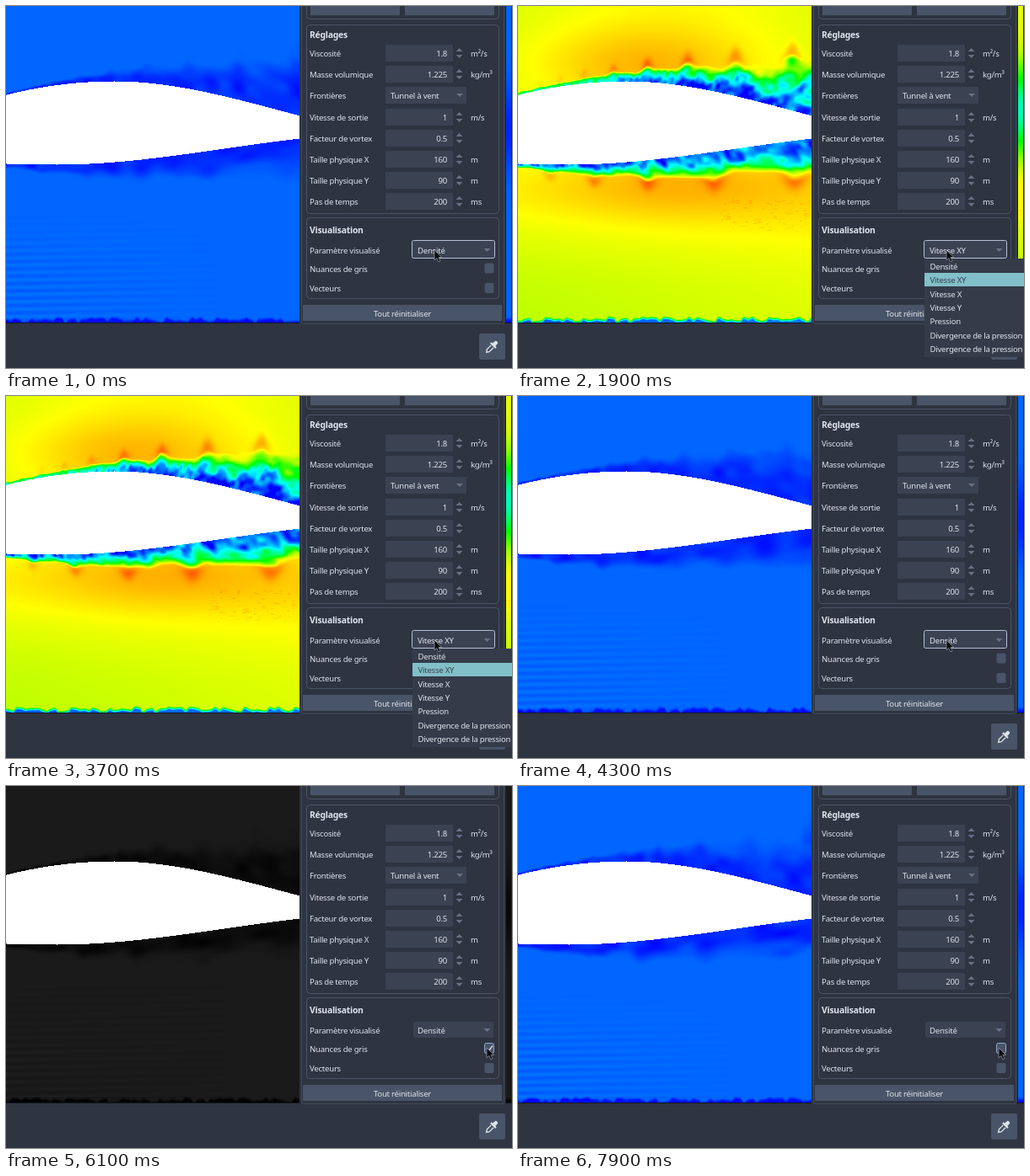
Animation of 600 by 430 pixels, one loop 8 s. Source, as an HTML page with a canvas:

```html
<!DOCTYPE html>
<html lang="fr">
<head>
<meta charset="utf-8">
<style>
html, body { margin: 0; width: 100%; height: 100%; overflow: hidden; background: #2e3440; }
canvas { display: block; }
</style>
</head>
<body>
<canvas id="stage" width="600" height="430"></canvas>
<script>
const ctx = document.getElementById('stage').getContext('2d');
const LOOP = 8000, STEP = 100, SIM_H = 376, WING_W = 349, STRIP_X = 593, STRIP_W = 6;
const DENSITY = 0, SPEED = 1, SPEED_X = 2;
const OPTIONS = ['Densité', 'Vitesse XY', 'Vitesse X', 'Vitesse Y', 'Pression',
  'Divergence de la pression', 'Divergence de la pression'];
const INK = '#dfe4ec', FIELD = '#3b4252', BUTTON = '#4a5468', BASE = '#2e3440', LINE = '#4c5568';

const clamp = (v, a = 0, b = 1) => Math.min(b, Math.max(a, v));
const mix = (a, b, k) => a + (b - a) * k;
const smooth = (v, a, b) => { const k = clamp((v - a) / (b - a)); return k * k * (3 - 2 * k); };
const bell = (v, mid, width) => Math.exp(-(((v - mid) / width) ** 2));

// Smooth value noise
function hash(i, j) {
  const s = Math.sin(i * 127.1 + j * 311.7) * 43758.5453;
  return s - Math.floor(s);
}
function noise(x, y) {
  const i = Math.floor(x), j = Math.floor(y);
  const a = smooth(x - i, 0, 1), b = smooth(y - j, 0, 1);
  return mix(mix(hash(i, j), hash(i + 1, j), a), mix(hash(i, j + 1), hash(i + 1, j + 1), a), b);
}

// Wing outline
function wingTop(x) {
  const d = x - 128;
  return 89 + d * d * (d < 0 ? 0.00098 : 0.001327 - 2.18e-6 * d);
}
function wingBottom(x) {
  const d = x - 60;
  return 188 - d * d * (d < 0 ? 0.00028 : 0.00072 - 1.2e-6 * d);
}

// Undisturbed flow, as a position 0..1 on the rainbow
function freeFlow(mode, x, y, upper) {
  if (mode === DENSITY) {
    const stripes = smooth(y, 235, 330) * clamp(1 - x / 260);
    return 0.1 + 0.012 * stripes * Math.sin(y * 0.72 + x * 0.012);
  }
  const speckle = !upper && x > 240 && x < 345 && y > 228 && y < 268 && noise(x / 5, y / 1.5) > 0.8 ? 0.02 : 0;
  if (mode === SPEED) {
    return speckle + (upper
      ? 0.7 + 0.05 * bell(x, 190, 180) + 0.075 * bell(x, 140, 130) * bell(y, 68, 45)
      : 0.685 + 0.03 * clamp(x / 350) + 0.045 * bell(y, 235, 75)
        + 0.085 * bell(y, 212, 42) * (0.35 + 0.65 * bell(x, 180, 140)));
  }
  return speckle + (upper
    ? 0.8 + 0.035 * clamp(x / 200) - 0.04 * bell(y, 95, 20) * clamp(1 - x / 120)
    : 0.79 + 0.085 * bell(x, 205, 130) * bell(y, 235, 55) - 0.03 * bell(x, 0, 60) * bell(y, 200, 50));
}

function layerFlow(mode, x, d, wave, height, upper, free) {
  if (d > height * 1.3 + 25) return free;
  const crest = Math.exp(2.5 * (Math.cos(2 * Math.PI * wave) - 1));
  const edge = height * (0.88 + 0.22 * crest);
  const u = d / edge + 0.25 * (noise(wave * 3 + 40, d / 12) - 0.5);
  if (mode === DENSITY) {
    const swirl = noise(wave * 4 + 90, d / 14) - 0.5;
    return free - 0.075 * (1 - smooth(u, 0.3, 1.25)) * (0.85 + 0.8 * swirl);
  }
  const fine = noise(wave * 13 + 60 - d / 16, d / 7) - 0.5;
  const swirl = 0.6 * (noise(wave * 5 + 90 - d / 30, d / 16) - 0.5) + 0.4 * fine;
  let core;
  if (mode === SPEED) {
    // Slow at the wall, faster towards the free stream
    const wall = upper ? mix(0.42, 0.1, smooth(x, 30, 180)) : 0.12;
    core = mix(wall, 0.5, smooth(u, 0.1, 0.95)) + swirl * 0.5;
  } else {
    core = (upper ? 0.38 : 0.4) + 0.08 * u + swirl * 0.3 - 0.25 * crest ** 3 * bell(u, 0.5, 0.3);
  }
  const reach = 4 + 6 * clamp(height / 30);
  const lump = (mode === SPEED ? 0.08 : 0.11) * clamp(height / 16) * crest * bell(d, edge + 4, reach);
  return mix(core, free, smooth(u, 0.65, 1.08)) + lump;
}

function stripFlow(mode, y) {
  const free = freeFlow(mode, 340, y, y < 130) - (mode === SPEED && y > 130 ? 0.04 : 0);
  const low = mode === DENSITY ? 0.035 : mode === SPEED ? 0.32 : 0.55;
  return mix(free, low, bell(y, mode === DENSITY ? 145 : 122, 48));
}

function paintValue(data, k, v, gray) {
  v = clamp(v);
  const s = v * 4;
  data[k] = 255 * (gray ? v : clamp(s - 2));
  data[k + 1] = 255 * (gray ? v : Math.min(clamp(s), clamp(4 - s)));
  data[k + 2] = 255 * (gray ? v : clamp(2 - s));
  data[k + 3] = 255;
}

const wind = ctx.createImageData(WING_W, SIM_H);
const strip = ctx.createImageData(STRIP_W, SIM_H);

function drawFlow(sec, mode, gray) {
  const floorCut = mode === DENSITY ? 0.09 : 0.6;
  for (let x = 0; x < WING_W; x++) {
    const top = wingTop(x), bottom = wingBottom(x);
    const upWave = Math.log(1 + 0.00944 * x) / 0.17 - 0.25 - 0.38 * (sec - 1.9);
    const lowWave = 5 * Math.log(1 + x / 200) - 0.85 - 0.48 * (sec - 1.9);
    const floorWave = noise(x / 5 - sec * 5, 3) - 0.5;
    for (let y = 0; y < SIM_H; y++) {
      const k = (y * WING_W + x) * 4;
      if (y >= top && y <= bottom) {
        wind.data.fill(255, k, k + 4);
        continue;
      }
      const upper = y < top;
      let v = freeFlow(mode, x, y, upper);
      v = upper
        ? layerFlow(mode, x, top - y, upWave, 3 + 0.00055 * x * x, true, v)
        : layerFlow(mode, x, y - bottom, lowWave, 5 + 0.11 * x, false, v);
      if (y > 367) v -= floorCut * smooth((y - 370) / 5 + floorWave * 1.2, 0, 1);
      paintValue(wind.data, k, v, gray);
    }
  }
  for (let y = 0; y < SIM_H; y++) {
    const v = stripFlow(mode, y) - floorCut * smooth(y, 368, 375);
    for (let x = 0; x < STRIP_W; x++) paintValue(strip.data, (y * STRIP_W + x) * 4, v, gray);
  }
  ctx.putImageData(wind, 0, 0);
  ctx.putImageData(strip, STRIP_X, 0);
}

// Interface helpers
function box(x, y, w, h, fill, stroke, r = 1) {
  ctx.beginPath();
  ctx.roundRect(x, y, w, h, r);
  if (fill) { ctx.fillStyle = fill; ctx.fill(); }
  if (stroke) { ctx.strokeStyle = stroke; ctx.lineWidth = 1; ctx.stroke(); }
}
function label(str, x, y, align = 'left', color = INK, font = '9.6px') {
  ctx.font = font + ' "Noto Sans", "Open Sans", sans-serif';
  ctx.letterSpacing = '-0.25px';
  ctx.textAlign = align;
  ctx.fillStyle = color;
  ctx.fillText(str, x, y + 3.6);
}
function poly(points, fill, stroke) {
  ctx.beginPath();
  points.forEach(([x, y]) => ctx.lineTo(x, y));
  ctx.closePath();
  if (fill) { ctx.fillStyle = fill; ctx.fill(); }
  if (stroke) { ctx.strokeStyle = stroke; ctx.lineWidth = 0.8; ctx.stroke(); }
}
function arrow(x, y, dir, size = 4) {
  poly([[x - size, y - dir * size / 2], [x + size, y - dir * size / 2], [x, y + dir * size / 2]], '#687186');
}
function path(points, color, width) {
  ctx.beginPath();
  points.forEach(([x, y]) => ctx.lineTo(x, y));
  ctx.strokeStyle = color;
  ctx.lineWidth = width;
  ctx.stroke();
}

function drawSettings() {
  const rows = [
    ['Viscosité', '1.8', 'm²/s'], ['Masse volumique', '1.225', 'kg/m³'], ['Frontières'],
    ['Vitesse de sortie', '1', 'm/s'], ['Facteur de vortex', '0.5', ''],
    ['Taille physique X', '160', 'm'], ['Taille physique Y', '90', 'm'], ['Pas de temps', '200', 'ms']
  ];
  label('Réglages', 360, 34, 'left', INK, 'bold 10.4px');
  rows.forEach(([name, value, unit], i) => {
    const y = Math.round(56 + i * 25.2);
    label(name, 360, y);
    box(450, y - 10, value ? 80 : 96, 20, FIELD);
    if (!value) {
      label('Tunnel à vent', 456, y);
      arrow(538, y, 1);
      return;
    }
    label(value, 523, y, 'right');
    arrow(537.5, y - 4, -1);
    arrow(537.5, y + 4, 1);
    label(unit, 551, y);
  });
}

function drawCheck(y, checked, focused) {
  box(567.5, y - 6, 11, 12, BUTTON, focused ? '#8fa9cf' : null, 2);
  if (checked) path([[570, y], [572.5, y + 3], [577, y - 3]], INK, 1.3);
}

function drawPanel(s) {
  ctx.fillStyle = '#15181e';
  ctx.fillRect(0, SIM_H, 600, 1);
  ctx.fillStyle = BASE;
  ctx.fillRect(0, 377, 600, 53);
  ctx.fillRect(348, 0, 244, 378);
  ctx.fillStyle = '#20242d';
  ctx.fillRect(592, 0, 1, SIM_H);
  ctx.fillRect(599, 0, 1, SIM_H);
  box(350.5, -10, 240, 387.5, null, '#414958', 2);
  box(356.5, -10, 228, 25.5, null, LINE, 4);
  box(361, -8, 106, 19, BUTTON);
  box(473, -8, 106, 19, BUTTON);
  box(356.5, 22.5, 228, 224, null, LINE, 4);
  box(356.5, 251.5, 228, 96, null, LINE, 4);
  drawSettings();

  label('Visualisation', 360, 266, 'left', INK, 'bold 10.4px');
  label('Paramètre visualisé', 360, 290);
  label('Nuances de gris', 360, 312);
  label('Vecteurs', 360, 335.5);
  if (s.checkFocus) box(483, 280, 95, 19, FIELD);
  else box(481.5, 278.5, 98, 21, FIELD, '#b4bfd4', 2);
  label(OPTIONS[s.mode], 488, 290);
  arrow(570.5, 290, 1);
  drawCheck(311.5, s.gray, s.checkFocus);
  drawCheck(335, false, false);
  box(352, 355, 236, 19, BUTTON);
  label('Tout réinitialiser', 470, 365, 'center');
  drawPipette();
}

function drawPipette() {
  box(561, 389, 31, 31, BUTTON, null, 2);
  ctx.save();
  ctx.translate(576, 405);
  ctx.rotate(Math.PI / 4);
  box(-2.2, -9, 4.4, 7, INK, null, 2);
  box(-4.5, -3.8, 9, 2.2, INK);
  path([[-2, -1], [-2, 6], [0, 9], [2, 6], [2, -1]], INK, 1.3);
  ctx.restore();
}

function drawPopup(mode) {
  box(482, 300, 118, 117, '#353b49', null, 0);
  OPTIONS.forEach((name, i) => {
    const y = 309.4 + i * 16.3;
    if (i === mode) {
      ctx.fillStyle = '#81bfc9';
      ctx.fillRect(482, Math.floor(y - 8.2), 118, 16);
    }
    label(name, 488.5, y, 'left', i === mode ? '#39424f' : INK);
  });
}

function drawCursor(x, y) {
  const shape = [[0, 0], [0, 12], [2.8, 9.4], [4.8, 13.8], [7, 12.8], [5, 8.6], [8.6, 8.4]];
  poly(shape.map(([a, b]) => [x + a, y + b]), '#08090b', '#8d94a2');
}

function stateAt(ms) {
  const small = smooth(ms, 4500, 4700), travel = smooth(ms, 5300, 5800);
  return {
    mode: ms < 1400 || ms >= 4100 ? DENSITY : ms >= 2400 && ms < 3300 ? SPEED_X : SPEED,
    open: ms >= 1000 && ms < 4300,
    gray: ms >= 5900 && ms < 7500,
    checkFocus: ms >= 5900,
    cursor: [508 + 4 * small + 58 * travel, 290 + small + 20 * travel]
  };
}

function draw(ms) {
  const s = stateAt(ms);
  drawFlow(ms / 1000, s.mode, s.gray);
  drawPanel(s);
  if (s.open) drawPopup(s.mode);
  drawCursor(...s.cursor);
}

const start = performance.now();
let last = -1;
function tick() {
  const ms = Math.floor((performance.now() - start) % LOOP / STEP) * STEP;
  if (ms !== last) draw(last = ms);
  requestAnimationFrame(tick);
}
tick();
</script>
</body>
</html>
```
